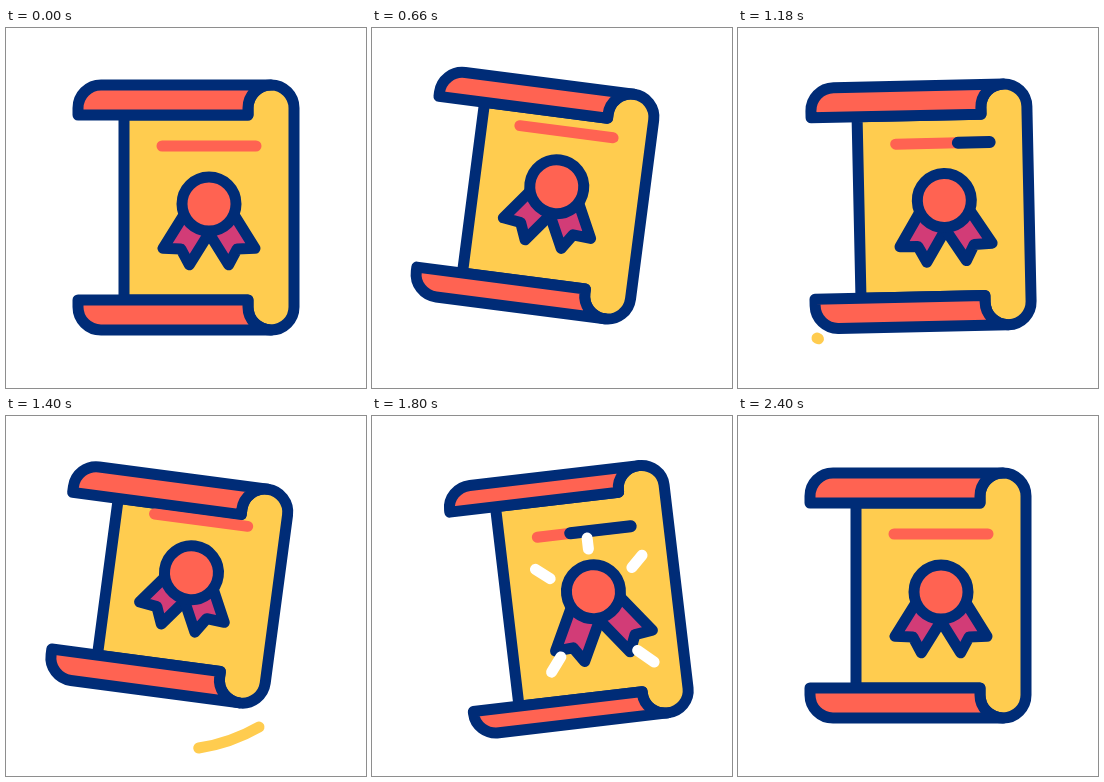
These frames come from a looping animation (360x360 px, 2800 ms). An HTML page:

```html
<!DOCTYPE html>
<html lang="en">
<head>
<meta charset="utf-8">
<title>Certificate</title>
<style>
  html, body { margin: 0; width: 100%; height: 100%; overflow: hidden; background: #fff; }
  svg { display: block; width: 100%; height: 100%; }
  path, line, circle { stroke-width: 11; stroke-linecap: round; stroke-linejoin: round; fill: none; }
  .ink { stroke: #002c77; }
  .paper { fill: #ffcc4f; }
  .red { fill: #ff6352; }
  .ribbon { fill: #d23c77; }
  #title { stroke: #ff6352; }
  #sweep { stroke-width: 12; }
  #trail { stroke: #ffcc4f; }
  .ray { stroke: #fff; }
</style>
</head>
<body>
<svg viewBox="0 0 360 360">
  <path id="trail" pathLength="1" d="M79 310A173 173 0 0 0 253 311"/>
  <g id="scroll">
    <path id="sheet" class="ink paper"/>
    <path id="topRoll" class="ink red"/>
    <path id="lowRoll" class="ink red"/>
    <g id="heading">
      <line id="title" x1="-24" x2="70"/>
      <line id="sweep" class="ink" pathLength="1" x1="-24" x2="70"/>
    </g>
    <g id="badge">
      <g id="tails">
        <path class="ink ribbon" transform="rotate(32)"/>
        <path class="ink ribbon" transform="rotate(-32)"/>
      </g>
      <circle class="ink red" r="27"/>
      <path class="ray" pathLength="1" d="M0 -43V-54"/>
      <path class="ray" pathLength="1" d="M-41.5 -18L-55 -29"/>
      <path class="ray" pathLength="1" d="M41 -19.5L52.5 -30.5"/>
      <path class="ray" pathLength="1" d="M-40 61L-51 75"/>
      <path class="ray" pathLength="1" d="M37 63.5L52 77"/>
    </g>
  </g>
</svg>
<script>
const LOOP = 2800;

// The tilt and the gap between the rolls drive everything on the sheet
const KEYS = [
  { t: 220,  tilt: 0,    gap: 185 },
  { t: 400,  tilt: 0.5,  gap: 154 },
  { t: 640,  tilt: 7.5,  gap: 172 },
  { t: 1020, tilt: -7.1, gap: 197 },
  { t: 1390, tilt: 7.6,  gap: 158 },
  { t: 1760, tilt: -6.8, gap: 201 },
  { t: 2390, tilt: 0,    gap: 185 }
];

const $ = id => document.getElementById(id);
const ribbons = document.querySelectorAll('.ribbon');
const rays = document.querySelectorAll('.ray');
const place = (el, x, y, turn = 0) =>
  el.setAttribute('transform', `translate(${x} ${y}) rotate(${turn})`);

function ease(t, from, to) {
  const p = Math.min(1, Math.max(0, (t - from) / (to - from)));
  return (1 - Math.cos(Math.PI * p)) / 2;
}

function poseAt(t) {
  const i = KEYS.findIndex(k => k.t > t);
  if (i < 1) return KEYS[0];
  const a = KEYS[i - 1], b = KEYS[i], k = ease(t, a.t, b.t);
  const mix = name => a[name] + (b[name] - a[name]) * k;
  return { tilt: mix('tilt'), gap: mix('gap') };
}

// Shows only the part of a stroke between two fractions of its length
function trim(el, start, end) {
  const size = end - start;
  el.style.display = size > 0.001 ? '' : 'none';
  el.setAttribute('stroke-dasharray', `${size} 3`);
  el.setAttribute('stroke-dashoffset', -start);
}

function drawScroll(gap, roll) {
  const ry = Math.min(23, roll - 2), lip = roll - ry;
  const low = roll + gap, end = low + roll;
  const arc = (x, y, turn = 1) => `A23 ${ry} 0 0 ${turn} ${x} ${y}`;
  $('sheet').setAttribute('d',
    `M-62 ${roll}H62V${ry}${arc(85, 0)}${arc(108, ry)}V${low + lip}` +
    `${arc(85, end)}${arc(62, low + lip)}V${low}H-62Z`);
  $('topRoll').setAttribute('d',
    `M-108 ${roll}V${ry}${arc(-85, 0)}H85${arc(62, ry, 0)}V${roll}Z`);
  $('lowRoll').setAttribute('d',
    `M-108 ${low}V${low + lip}${arc(-85, end, 0)}H85${arc(62, low + lip)}V${low}Z`);
}

function drawSheet(t) {
  const { tilt, gap } = poseAt(t);
  const lean = Math.abs(tilt), stretch = gap - 185;
  const hop = 6 * (ease(t, 400, 640) - ease(t, 640, 1020));
  const roll = 30 - 0.12 * stretch - 0.6 * lean;
  const edge = 87 - 0.17 * stretch - 0.1 * lean - hop;
  const titleY = roll + 31 + 0.56 * stretch - 0.7 * lean;
  const length = 62 + 0.17 * stretch - 0.6 * Math.min(tilt, 0);

  place($('scroll'), 180 - 0.33 * tilt, edge - roll, tilt);
  drawScroll(gap, roll);
  place($('heading'), 0, titleY);
  place($('badge'), 23 - 0.35 * tilt, titleY + 58 + 0.17 * stretch);
  place($('tails'), 0, 0, 0.8 * tilt);
  for (const r of ribbons)
    r.setAttribute('d', `M-15.5 12V${length}L0 ${length - 9}L15.5 ${length}V12Z`);
}

function drawStrokes(t) {
  const start = t < 1400 ? 840 : 1500;
  trim($('sweep'), ease(t, start + 220, start + 420), ease(t, start, start + 200));

  // The trail streams against the swing of the sheet
  const pass = t < 1100 ? 750 : 1170;
  const head = ease(t, pass, pass + 180), tail = ease(t, pass + 100, pass + 320);
  if (t < 1100) trim($('trail'), 1 - head, 1 - tail);
  else trim($('trail'), tail, head);

  for (const r of rays) trim(r, ease(t, 1810, 1930), ease(t, 1660, 1780));
}

const begin = performance.now();
function tick() {
  const t = (performance.now() - begin) % LOOP;
  drawSheet(t);
  drawStrokes(t);
  requestAnimationFrame(tick);
}
tick();
</script>
</body>
</html>
```
